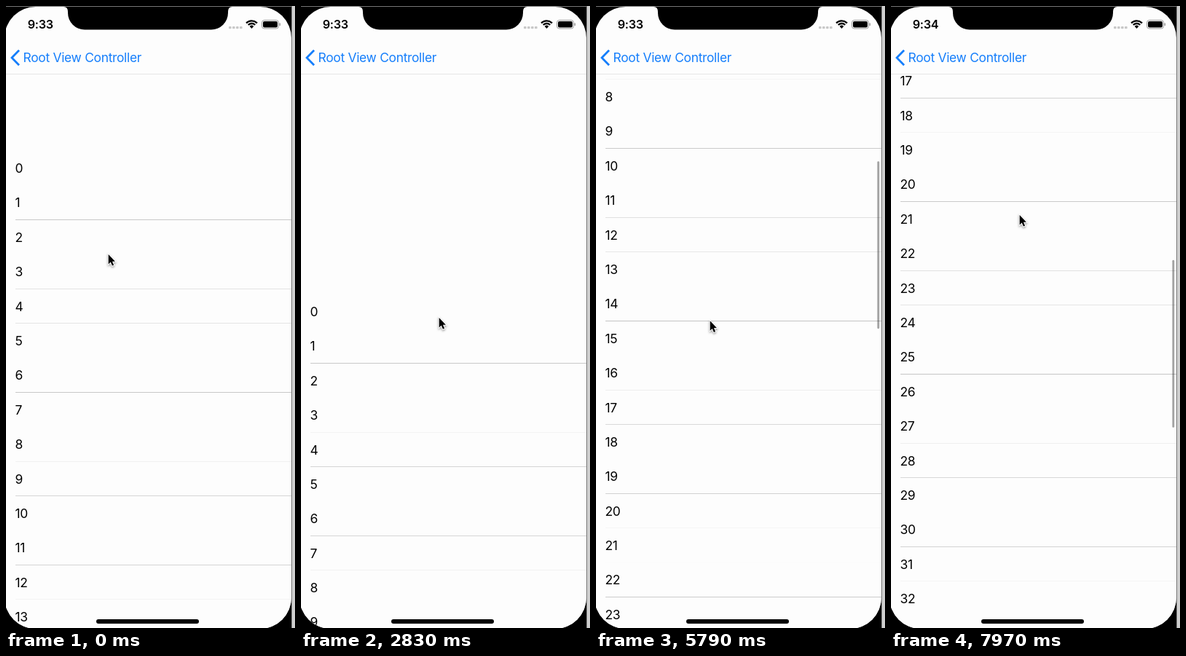
An HTML page with a canvas for the animation above (8 s loop, 397 px wide and 854 px high).

```html
<!DOCTYPE html>
<html lang="en">
<head>
<meta charset="utf-8">
<title>Pull-up list panel</title>
<style>
html, body { margin: 0; width: 100%; height: 100%; overflow: hidden; background: #000; }
canvas { display: block; }
</style>
</head>
<body>
<canvas id="stage" width="397" height="854"></canvas>
<script>
const c = document.getElementById('stage').getContext('2d');
const LOOP = 8000, TICK = 10;
const ROW = 47.385, ROWS = 50, CONTENT = ROW * ROWS;
const W = 392, BOTTOM = 854, NAV = 94, HALF = 198.77;
const DISMISSED = 1180, PRESS = 2480, PRESENT = 2620, DECAY = 580;
const PAPER = '#fdfdfd', BLUE = '#157efb';
const UI = 'Inter, Roboto, sans-serif';

// Pointer moves; those with a fling drag the list and let it coast by that distance.
const HOME = { x: 141, y: 341 };
const moves = [
  { start: 100, end: 830, x: 175, y: 497, fling: 0 },
  { start: 1630, end: 2180, x: 190, y: 428 },
  { start: 3270, end: 3600, x: 141, y: 401.3 },
  { start: 3716, end: 4250, x: 143, y: 294, fling: 461.6 },
  { start: 5450, end: 5790, x: 157, y: 432.3, fling: -442.2 },
  { start: 6580, end: 6950, x: 177, y: 287, fling: 763.4 },
];

function ease(t, start, end) {
  const u = Math.min(1, Math.max(0, (t - start) / (end - start)));
  return u * u * (3 - 2 * u);
}

function pose(t) {
  let { x, y } = HOME, scroll = 0;
  moves.forEach((m, i) => {
    const u = ease(t, m.start, m.end), dy = (m.y - y) * u;
    x += (m.x - x) * u;
    y += dy;
    const stale = m.end < DISMISSED && t > DISMISSED;
    if (m.fling === undefined || t < m.start || stale) return;
    const stop = moves[i + 1]?.start ?? LOOP;
    const coast = Math.max(0, Math.min(t, stop) - m.end);
    scroll += m.fling * (1 - Math.exp(-coast / DECAY)) - dy;
  });
  if (scroll < 0) {
    // Rubber band past the top edge.
    const h = BOTTOM - HALF, pull = 0.55 * scroll;
    scroll = h * pull / (h - pull);
  }
  const hidden = ease(t, 840, DISMISSED) - ease(t, PRESENT, PRESENT + 330);
  const top = HALF + (BOTTOM - HALF) * hidden - (HALF - NAV) * ease(t, 4070, 4400);
  const bar = ease(t, 60, 160) - ease(t, 1000, DISMISSED) + ease(t, 3640, 3760);
  return { x, y, scroll, top, bar };
}

function rect(x, y, w, h, color, r = 0) {
  c.fillStyle = color;
  c.beginPath();
  c.roundRect(x, y, w, h, r);
  c.fill();
}

function text(s, x, y, font, color, spacing = 0) {
  c.font = font;
  c.letterSpacing = spacing + 'px';
  c.fillStyle = color;
  c.fillText(s, x, y);
}

function drawRows(top, scroll) {
  for (let k = 0; k < ROWS; k++) {
    const y = top - scroll + (k + 1) * ROW;
    if (y < top - 5 || y > BOTTOM + ROW) continue;
    text(k, 12.5, y - 17.1, `17.4px ${UI}`, '#000', -0.25);
    // Hairlines fade as they fall between pixel rows.
    const px = Math.floor(y), ink = 1 - Math.abs(y - px - 0.5) / 0.33;
    if (ink > 0) rect(13, px, W - 13, 1, `rgba(0,0,0,${0.24 * ink})`);
  }
}

function drawBar(top, scroll, alpha) {
  const height = BOTTOM - Math.min(top, HALF), track = height - 43;
  const length = track * height / CONTENT + Math.min(0, scroll);
  const y = top + 6.5 + Math.max(0, scroll) * track / CONTENT;
  rect(386.4, y, 2.8, length, `rgba(0,0,0,${0.36 * alpha})`, 1.4);
}

function drawPanel({ top, scroll, bar }) {
  c.save();
  c.beginPath();
  c.rect(0, top, W, BOTTOM - top);
  c.clip();
  rect(0, top, W, BOTTOM - top, PAPER);
  drawRows(top, scroll);
  drawBar(top, scroll, bar);
  c.restore();
}

function drawStatus(t) {
  text(t < 7050 ? '9:33' : '9:34', 29.8, 31, `600 16.2px ${UI}`, '#000', -0.3);
  for (let i = 0; i < 4; i++) rect(306 + i * 5, 28, 3.6, 3.2, '#c8c8c8', 1);

  c.strokeStyle = '#000';
  c.lineWidth = 2.3;
  for (const r of [6.5, 10.2]) {
    c.beginPath();
    c.arc(337.5, 30.5, r, -Math.PI * 0.76, -Math.PI * 0.24);
    c.stroke();
  }
  c.fillStyle = '#000';
  c.beginPath();
  c.moveTo(337.5, 31);
  c.arc(337.5, 30.5, 3.8, -Math.PI * 0.76, -Math.PI * 0.24);
  c.fill();

  c.strokeStyle = '#999';
  c.lineWidth = 1;
  c.beginPath();
  c.roundRect(351.5, 19.5, 23, 11.5, 3.2);
  c.stroke();
  rect(353, 21, 20, 8.5, '#000', 2);
  rect(375.6, 23.3, 1.4, 4, '#999', 0.7);
}

function drawNav() {
  rect(0, 93, W, 1, '#e6e6e6');
  c.strokeStyle = BLUE;
  c.lineWidth = 2.8;
  c.beginPath();
  c.moveTo(18, 60.8);
  c.lineTo(8, 71);
  c.lineTo(18, 81.2);
  c.stroke();
  text('Root View Controller', 23.6, 77, `17.4px ${UI}`, BLUE, -0.3);
}

function drawNotch() {
  c.fillStyle = '#000';
  c.beginPath();
  c.moveTo(79, 0);
  c.lineTo(79, 1);
  c.quadraticCurveTo(85, 1, 85, 8);
  c.arcTo(85, 32.5, 109, 32.5, 23);
  c.arcTo(305, 32.5, 305, 8, 23);
  c.lineTo(305, 8);
  c.quadraticCurveTo(305, 1, 311, 1);
  c.lineTo(311, 0);
  c.fill();
}

const arrow = new Path2D('M0 0V13.4L3 10.6L5.2 15.6L7.4 14.7L5.3 9.7H9.2Z');
function drawCursor({ x, y }) {
  c.save();
  c.translate(x - 0.3, y);
  c.shadowColor = 'rgba(0,0,0,.4)';
  c.shadowBlur = 3;
  c.shadowOffsetY = 1.5;
  c.strokeStyle = '#fff';
  c.lineWidth = 2;
  c.stroke(arrow);
  c.shadowColor = 'transparent';
  c.fillStyle = '#000';
  c.fill(arrow);
  c.restore();
}

function draw(t) {
  const state = pose(t);
  rect(0, 0, 397, BOTTOM, '#000');
  c.save();
  c.beginPath();
  c.roundRect(-2, 1, W + 2, BOTTOM, 43);
  c.clip();
  rect(0, 0, W, BOTTOM, PAPER);
  const pressed = t >= PRESS && t < PRESENT + 330;
  text('弹出来', 170.5, 434, '15.9px "Noto Sans CJK SC", "Noto Sans CJK", sans-serif',
    pressed ? '#c9c9c9' : '#000');
  drawPanel(state);
  drawNav();
  drawStatus(t);
  drawNotch();
  rect(124, 842, 141, 6, '#000', 3);
  c.restore();
  rect(0, 0, 397, 1, '#777');
  rect(W, 0, 1, BOTTOM, '#777');
  rect(W + 1, 0, 4, BOTTOM, '#cfcfcf');
  drawCursor(state);
}

function frame() {
  draw(Math.round(performance.now() / TICK) * TICK % LOOP);
  requestAnimationFrame(frame);
}
frame();
</script>
</body>
</html>
```
